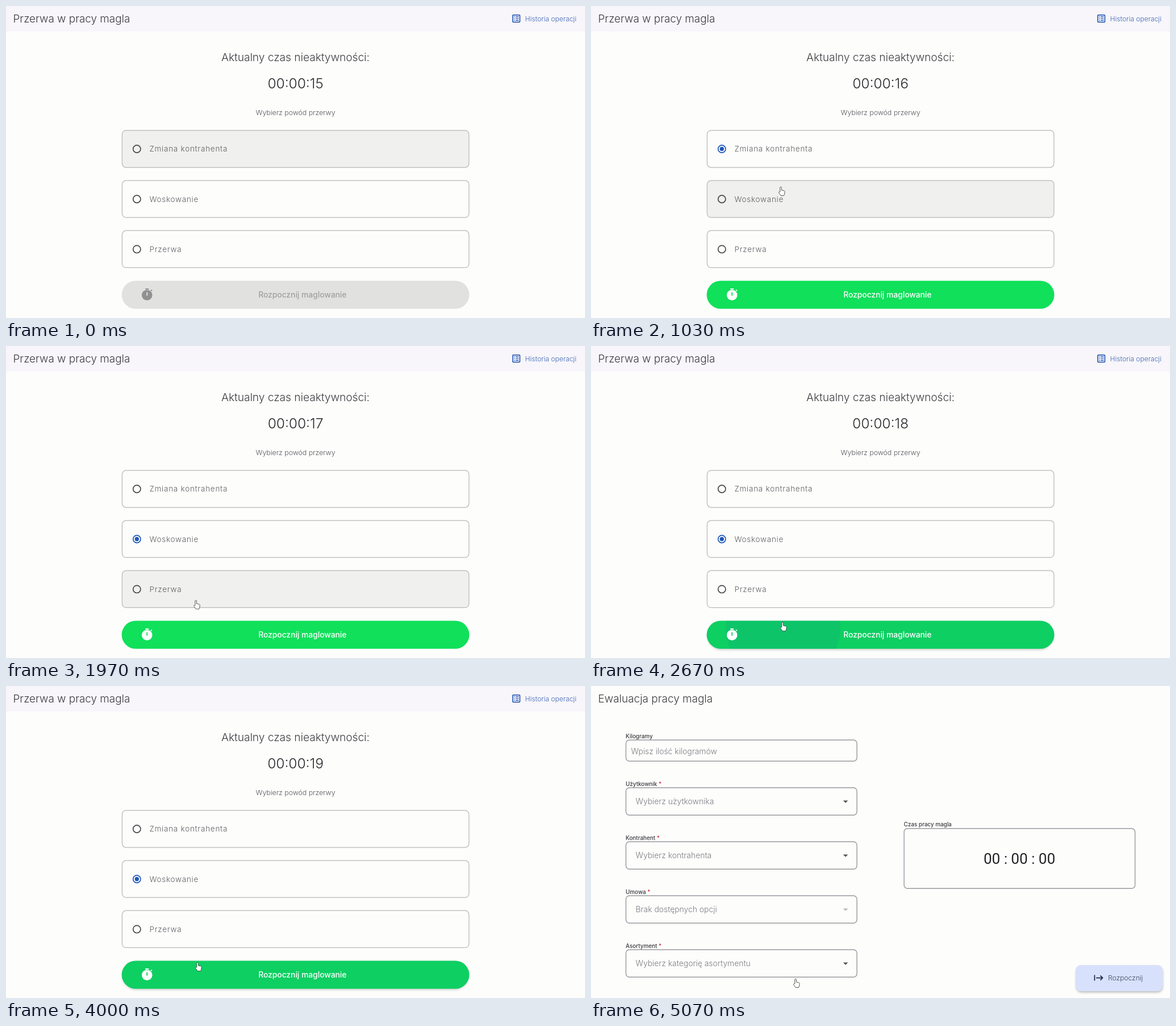
An HTML page for the animation above (5110 ms loop, 1019 px wide and 549 px high).

```html
<!DOCTYPE html>
<html lang="pl">
<head>
<meta charset="utf-8">
<title>Przerwa w pracy magla</title>
<style>
  html, body { margin: 0; width: 100%; height: 100%; overflow: hidden; background: #fdfdfc; }
  svg { display: block; width: 1019px; height: 549px; }
  text { font-family: Inter, "Open Sans", sans-serif; font-weight: 300; white-space: pre; }
  .clock { font-family: Roboto, Inter, sans-serif; font-weight: 400; }
</style>
</head>
<body>
<svg id="stage" viewBox="0 0 1019 549" xmlns="http://www.w3.org/2000/svg">
  <defs>
    <clipPath id="pill"><rect x="203.6" y="483.4" width="611.8" height="49.4" rx="24.7"/></clipPath>
    <filter id="soft" x="-20%" y="-40%" width="140%" height="200%"><feGaussianBlur stdDeviation="2"/></filter>
  </defs>
  <g id="pause"></g>
  <rect id="scrim" width="1019" height="549" fill="#000" opacity="0"/>
  <g id="form"></g>
  <g id="cursor">
    <path id="hand" d="M3 9V1.5a1.3 1.3 0 0 1 2.6 0V6l4.5 1c1 .3 1.4 1 1.3 2l-.6 4-1 2.5H4.5L.8 10.5c-.6-1 .6-2 1.5-1.2z"
      transform="translate(-4.3 0)" fill="#fff" stroke="#444" stroke-width=".9" stroke-linejoin="round"/>
    <path id="arrow" d="M0 0V11.5L2.7 9l1.8 4 1.8-.8-1.8-3.9H8z" fill="#fff" stroke="#666" stroke-width=".9" stroke-linejoin="round"/>
  </g>
</svg>
<script>
const LOOP = 5110;
const CLICK = { first: 270, second: 1500, start: 2590 };
const ZOOM = { at: 4398, span: 300 };
const TICK = 450;
const BLUE = '#1f58b8', GREEN = [16, 224, 90], DARK = [14, 207, 98];

const $ = id => document.getElementById(id);
const pause = $('pause'), form = $('form');

function add(parent, tag, attrs, content) {
  const el = document.createElementNS('http://www.w3.org/2000/svg', tag);
  for (const key in attrs) el.setAttribute(key, attrs[key]);
  if (content) el.textContent = content;
  parent.append(el);
  return el;
}
const set = (el, key, value) => el.setAttribute(key, value);

// y is the middle of the capital letters
function label(parent, content, x, y, size, fill, extra) {
  return add(parent, 'text', { x, y: y + size * .364, 'font-size': size, fill, ...extra }, content);
}
function box(parent, x, y, width, height, rx, attrs) {
  return add(parent, 'rect', { x, y, width, height, rx, ...attrs });
}

const clamp = v => Math.max(0, Math.min(1, v));
const ramp = (t, from, to) => clamp((t - from) / (to - from));
const mix = (a, b, k) => `rgb(${a.map((v, i) => Math.round(v + (b[i] - v) * k))})`;
const pulse = (t, on, off) => ramp(t, on, on + 60) * (1 - ramp(t, off, off + 120));

function bezier(x1, y1, x2, y2) {
  const at = (a, b, s) => 3 * (1 - s) ** 2 * s * a + 3 * (1 - s) * s * s * b + s ** 3;
  return x => {
    let lo = 0, hi = 1;
    for (let i = 0; i < 24; i++) {
      const mid = (lo + hi) / 2;
      if (at(x1, x2, mid) < x) lo = mid; else hi = mid;
    }
    return at(y1, y2, lo);
  };
}
const easeOut = bezier(.208333, .82, .25, 1), easeIn = bezier(.05, 0, .133333, .06);
const zoomCurve = p => p <= 0 ? 0 : p >= 1 ? 1
  : p < 1 / 6 ? .4 * easeIn(p * 6) : .4 + .6 * easeOut((p - 1 / 6) * 1.2);

// Break page
const middle = { 'text-anchor': 'middle' };
const bold = { style: 'font-weight: 500' };
box(pause, 0, 0, 1019, 549, 0, { fill: '#fdfdfc' });
box(pause, 0, 0, 1019, 45, 0, { fill: '#f8f6fa' });
label(pause, 'Przerwa w pracy magla', 12.5, 22.5, 18.9, '#3c3b3f');
label(pause, 'Historia operacji', 913.5, 22.5, 12.05, '#3f66b5');
box(pause, 891.8, 15.8, 12.6, 12.6, 1.2, { fill: 'none', stroke: '#2c5cb8', 'stroke-width': 1.7 });
for (const y of [19, 22.1, 25.2])
  add(pause, 'path', { d: `M894 ${y}h1.6M897 ${y}h5.2`, stroke: '#2c5cb8', 'stroke-width': 1.4 });
label(pause, 'Aktualny czas nieaktywności:', 509.5, 90, 19.1, '#3c3b3f', middle);
const counter = label(pause, '00:00:15', 509.5, 135.7, 24.5, '#29282b', middle);
label(pause, 'Wybierz powód przerwy', 509.5, 188, 12.3, '#55545a', middle);

const options = ['Zmiana kontrahenta', 'Woskowanie', 'Przerwa'].map((name, i) => {
  const y = 218.8 + i * 88.2, mid = y + 32.7;
  const card = box(pause, 204.4, y, 610.4, 65.2, 7, { stroke: '#b8b8b8', 'stroke-width': 1.25 });
  const ring = add(pause, 'circle', { cx: 230.3, cy: mid, r: 6.6, fill: 'none', 'stroke-width': 1.7 });
  const dot = add(pause, 'circle', { cx: 230.3, cy: mid, r: 3.7, fill: BLUE });
  label(pause, name, 252.5, mid, 13.4, '#5f5e62', { 'letter-spacing': .8 });
  return { card, ring, dot };
});

const shade = box(pause, 205, 485.5, 609, 49, 24.5, { fill: '#000', filter: 'url(#soft)' });
const button = box(pause, 203.6, 483.4, 611.8, 49.4, 24.7, {});
const ripple = add(add(pause, 'g', { 'clip-path': 'url(#pill)' }), 'circle', { cx: 338, cy: 494, fill: '#10a878' });
const watch = add(pause, 'g', {});
add(watch, 'circle', { cx: 248.2, cy: 508.7, r: 9.3 });
add(watch, 'path', { d: 'M245.2 496.9h6v2.2h-6zM254.4 500.3l1.6-1.5 1.5 1.6-1.6 1.5z' });
const needle = add(pause, 'path', { d: 'M248.2 503.7v6', 'stroke-width': 1.9 });
const caption = label(pause, 'Rozpocznij maglowanie', 521.8, 508.4, 13.8, '#fff', { ...middle, ...bold });

// Form page
const frame = { fill: 'none', stroke: '#9a9aa0', 'stroke-width': 1.4 };
function fieldName(name, x, y, required) {
  const el = label(form, name, x, y, 9.9, '#3a393d', bold);
  if (required) add(el, 'tspan', { fill: '#d02a3a' }, ' *');
}
box(form, 0, 0, 1019, 549, 0, { fill: '#fdfdfc' });
label(form, 'Ewaluacja pracy magla', 12.5, 22.5, 18.95, '#3c3b3f');
fieldName('Kilogramy', 61, 88.5);
box(form, 61.5, 95, 406.5, 37.3, 6, frame);
label(form, 'Wpisz ilość kilogramów', 70.5, 114.5, 13.9, '#7c7b80');
[
  ['Użytkownik', 'Wybierz użytkownika'],
  ['Kontrahent', 'Wybierz kontrahenta'],
  ['Umowa', 'Brak dostępnych opcji'],
  ['Asortyment', 'Wybierz kategorię asortymentu']
].forEach(([name, hint], i) => {
  const y = 179 + i * 95;
  fieldName(name, 61, y - 7, true);
  box(form, 61.5, y, 406.5, 48.3, 6, frame);
  label(form, hint, 78.5, y + 24.3, 13.9, '#7c7b80');
  add(form, 'path', { d: `M443.6 ${y + 22.4}h8.8l-4.4 4.4z`, fill: i === 2 ? '#b9b9bc' : '#55545a' });
});
fieldName('Czas pracy magla', 550.5, 243.5);
box(form, 551, 250.7, 406.5, 105.6, 6, frame);
label(form, '00 : 00 : 00', 754, 303.5, 26, '#232226', { ...middle, class: 'clock' });
box(form, 854, 494, 152, 45, 9, { fill: '#000', opacity: .28, filter: 'url(#soft)' });
box(form, 853, 491, 153, 46, 9, { fill: '#d8e1fb' });
add(form, 'path', {
  d: 'M886.3 508.6v10M889 513.6h11M896.4 509.6l4 4-4 4',
  fill: 'none', stroke: '#1d2a4a', 'stroke-width': 1.7
});
label(form, 'Rozpocznij', 910, 513.7, 12.1, '#3c4560');

// Pointer stops: time, x, y
const stops = [
  [0, 343, 252], [480, 343, 252], [800, 335, 314], [1030, 334, 318], [1530, 333, 350],
  [1630, 330, 387], [1800, 332, 420], [2200, 337, 484], [2400, 337, 486],
  [4680, 337, 486], [5040, 360, 515], [LOOP, 360, 515]
];
function pointer(t) {
  const i = Math.max(1, stops.findIndex(s => s[0] > t));
  const [t0, x0, y0] = stops[i - 1], [t1, x1, y1] = stops[i];
  const k = ramp(t, t0, t1);
  return [x0 + (x1 - x0) * k, y0 + (y1 - y0) * k];
}
const inGap = y => (y > 284 && y < 307) || (y > 372 && y < 395) || (y > 460 && y < 484);

function zoom(el, scale) {
  set(el, 'transform', `translate(509.5 274.5) scale(${scale}) translate(-509.5 -274.5)`);
}

function draw(t) {
  counter.textContent = '00:00:' + (15 + Math.floor((t - TICK) / 1000 + 1));

  const hover = [1 - ramp(t, 620, 740), pulse(t, 750, 1580), pulse(t, 1670, 2040)];
  const second = ramp(t, CLICK.second, CLICK.second + 120);
  const chosen = [ramp(t, CLICK.first, CLICK.first + 100) * (1 - second), second, 0];
  options.forEach(({ card, ring, dot }, i) => {
    set(card, 'fill', mix([253, 253, 252], [240, 240, 238], hover[i]));
    set(ring, 'stroke', mix([73, 72, 76], [31, 88, 184], chosen[i]));
    set(dot, 'r', 3.7 * chosen[i]);
  });

  const live = ramp(t, CLICK.first, CLICK.first + 120);
  const over = ramp(t, 2200, 2300);
  const fill = over ? mix(GREEN, DARK, over) : mix([225, 225, 224], GREEN, live);
  set(button, 'fill', fill);
  set(needle, 'stroke', fill);
  set(shade, 'opacity', .2 * over);
  set(watch, 'fill', mix([145, 145, 145], [255, 255, 255], live));
  set(caption, 'fill', mix([160, 160, 160], [255, 255, 255], live));
  const since = t - CLICK.start;
  set(ripple, 'r', since > 0 ? Math.min(500, 20 + since) : 0);
  set(ripple, 'opacity', .3 * (1 - ramp(since, 120, 400)));

  const p = clamp((t - ZOOM.at) / ZOOM.span), z = zoomCurve(p);
  zoom(pause, 1 + .05 * z);
  zoom(form, .85 + .15 * z);
  set(form, 'opacity', ramp(p, .125, .25));
  set($('scrim'), 'opacity', .6 * ramp(p, .2075, .4175));

  const [x, y] = pointer(t), gap = t < ZOOM.at && inGap(y);
  set($('cursor'), 'transform', `translate(${x} ${y})`);
  set($('cursor'), 'opacity', t < 35 ? 0 : 1);
  set($('hand'), 'opacity', gap ? 0 : 1);
  set($('arrow'), 'opacity', gap ? 1 : 0);
}

const begin = performance.now();
function tick() {
  draw((performance.now() - begin) % LOOP);
  requestAnimationFrame(tick);
}
draw(0);
requestAnimationFrame(tick);
</script>
</body>
</html>
```
